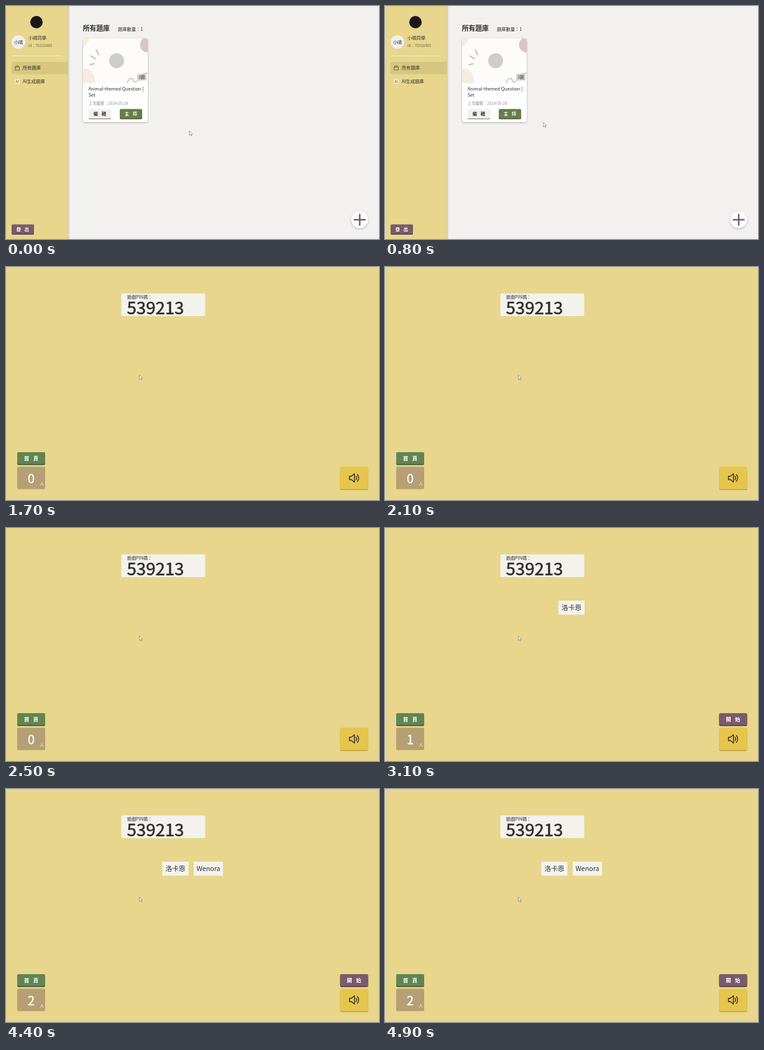
Animation of 600 by 375 pixels, one loop 5 s. Source, as an HTML page:

```html
<!DOCTYPE html>
<html lang="zh-Hant">
<head>
<meta charset="utf-8">
<title>題庫</title>
<style>
html, body { margin: 0; width: 100%; height: 100%; overflow: hidden; background: #e7d68b; }
svg { display: block; width: 100vw; height: 100vh; }
text { font-family: "Noto Sans CJK TC", "Noto Sans CJK", "Noto Sans TC", sans-serif; fill: #2e2e2e; white-space: pre; }
.s { font-size: 7.25px; }
.b { font-weight: 700; }
.m { font-weight: 500; }
.mid { text-anchor: middle; }
.w { fill: #fff; }
.big { font-size: 8.4px; font-weight: 700; fill: #fff; }
.name { font-size: 10.7px; }
.line { fill: none; stroke-linecap: round; stroke-linejoin: round; }
.soft { filter: drop-shadow(0 1px 1.5px rgba(0, 0, 0, .28)); }
</style>
</head>
<body>
<svg viewBox="0 0 600 375">
  <defs>
    <clipPath id="cover"><path d="M124 124V56a4 4 0 0 1 4-4h96a4 4 0 0 1 4 4v68z"/></clipPath>
    <linearGradient id="edge"><stop stop-color="#000" stop-opacity=".2"/><stop offset="1" stop-color="#000" stop-opacity="0"/></linearGradient>
  </defs>

  <g id="home">
    <rect width="600" height="375" fill="#f2f1ef"/>
    <rect x="99" width="4" height="375" fill="url(#edge)"/>
    <rect width="99.5" height="375" fill="#e7d68b"/>
    <circle cx="49" cy="26" r="10" fill="#191817"/>
    <circle cx="20" cy="58" r="11" fill="#f1efec"/>
    <text class="s mid" x="20" y="60.7">小晴</text>
    <text class="s" x="36" y="54">小晴同學</text>
    <text x="36" y="66.3" font-size="6.05" style="fill:#6b664f">id：70316485</text>
    <path d="M9 80.3h81.5" stroke="#f6f1dc"/>
    <path d="M99.5 90H12a3 3 0 0 0-3 3v13.5a3 3 0 0 0 3 3h87.5z" fill="#d6c67f"/>
    <g class="line" stroke="#57503a" stroke-width=".9">
      <rect x="14.5" y="98.3" width="7" height="4.8" rx=".8"/>
      <path d="M15 98l1.2-1.7h3.6l1.2 1.7"/>
    </g>
    <text class="s" x="27" y="102.4">所有題庫</text>
    <rect x="14" y="117.5" width="8" height="8" rx="1.3" fill="#f4eed3"/>
    <text class="b mid" x="18" y="123.7" font-size="5.5" style="fill:#9a8a4e">AI</text>
    <text class="s" x="27" y="124.2">AI生成題庫</text>
    <rect x="9" y="352" width="36" height="16" rx="2" fill="#573f4b"/>
    <rect x="9" y="351.5" width="36" height="15" rx="2" fill="#7b5a6b"/>
    <text class="s b w" x="16.7 29.7" y="361.8">登出</text>

    <text class="b" x="123.7" y="39.5" font-size="10.8">所有題庫</text>
    <text class="s m" x="180" y="39.5">題庫數量：1</text>

    <rect class="soft" x="124" y="52" width="104" height="135" rx="4" fill="#fff"/>
    <g clip-path="url(#cover)">
      <rect x="124" y="52" width="104" height="72" fill="#fdfcfa"/>
      <circle cx="228" cy="62.5" r="12.5" fill="#d5c6cc"/>
      <path d="M122 52h12q-1 8-10 14z" fill="#f4ecdd"/>
      <path d="M122 102q10-3 16 4t5 20h-21z" fill="#f5ecdf"/>
      <g class="line" stroke="#dfc1b9">
        <path d="M195 123c5-9 9-7 10-3s6 3 9-4 6-7 14-8" stroke-width="1.8"/>
        <path d="M145.5 71l3.5 7M137 80.500l6.500 4.500M135.500 94.500l6-1.500" stroke-width="2.600"/>
      </g>
      <circle cx="178" cy="88" r="12" fill="#cfcccc"/>
    </g>
    <rect x="211" y="109" width="15" height="11" rx="2" fill="#d6d3d0"/>
    <text class="m mid" x="218.5" y="117" font-size="6.7">3題</text>
    <text class="m" font-size="7.25"><tspan x="132.7" y="136">Animal-themed Question</tspan><tspan x="132.7" y="146">Set</tspan></text>
    <path class="line" d="M220.3 131.5v0M220.3 134.3v0M220.3 137.1v0" stroke="#2e2e2e" stroke-width="1.4"/>
    <text x="132.7" y="159" font-size="6.3" style="fill:#8d8d8d">上次編輯：2024-05-28</text>
    <rect x="133" y="167" width="36" height="15.3" rx="2" fill="#8d8d89"/>
    <rect x="133" y="165.7" width="36" height="15.3" rx="2" fill="#f2f1ef"/>
    <text class="s b" x="140.7 153.7" y="176">編輯</text>
    <rect id="hostEdge" x="183" y="167" width="36" height="15.3" rx="2"/>
    <rect id="host" x="183" y="165.7" width="36" height="15.3" rx="2"/>
    <text class="s b w" x="190.7 203.7" y="176">主持</text>

    <circle class="soft" cx="569" cy="344" r="13.7" fill="#fff"/>
    <path d="M559.5 344h19M569 334.5v19" stroke="#7b5a6b" stroke-width="2.5"/>
  </g>

  <g id="lobby">
    <rect width="600" height="375" fill="#e7d68b"/>
    <rect x="185.5" y="42.5" width="135" height="36.5" rx="2" fill="#f4f2ed"/>
    <text class="m" x="194.7" y="51" font-size="7.2">遊戲PIN碼：</text>
    <text x="194.5" y="76" font-size="27.6" stroke="#2e2e2e" stroke-width=".6">539213</text>

    <g id="first">
      <rect x="279" y="117" width="42" height="22.5" fill="#f5f3ee"/>
      <text class="name mid" x="300" y="132.3">洛卡恩</text>
    </g>
    <g id="second">
      <rect x="302" y="117" width="47" height="22.5" fill="#f5f3ee"/>
      <text class="name mid" x="325.5" y="132.3">Wenora</text>
    </g>

    <rect x="18" y="299" width="45" height="19.7" rx="2" fill="#465c3c"/>
    <rect x="18" y="298" width="45" height="19" rx="2" fill="#628452"/>
    <text class="big" x="29 43.7" y="311">首頁</text>
    <rect x="18" y="321.5" width="45" height="36" rx="2" fill="#b69f74"/>
    <text id="count" class="mid w" x="40.5" y="347.8" font-size="20" stroke="#fff" stroke-width=".4"></text>
    <text class="w" x="54.5" y="351.5" font-size="6.5">人</text>

    <g id="start">
      <rect x="537.5" y="299" width="45" height="19.7" rx="2" fill="#573f4b"/>
      <rect x="537.5" y="298" width="45" height="19" rx="2" fill="#7b5a6b"/>
      <text class="big" x="548.2 563" y="311">開始</text>
    </g>
    <rect x="537.5" y="323" width="45" height="36" rx="2" fill="#c2a242"/>
    <rect x="537.5" y="321.5" width="45" height="36" rx="2" fill="#e6c54d"/>
    <path class="line" d="M552.5 336.8h3.2l4.8-4v13.400l-4.800-4h-3.200zM563 336.600q2.400 2.900 0 5.800M565.300 334q4.300 5.500 0 11" stroke="#2e2e2e" stroke-width="1.400"/>
  </g>

  <path id="cursor" d="M0 0V7.2L1.7 5.7L2.9 8.2L4 7.7L2.9 5.3H5Z" fill="#fff" stroke="#666" stroke-width=".6"/>
</svg>
<script>
const LOOP = 5000, STEP = 100;
const LOBBY = 1700, JOIN_1 = 3100, JOIN_2 = 3800;
const $ = id => document.getElementById(id);
const show = (id, on) => $(id).setAttribute("display", on ? "inline" : "none");
const ease = u => u * u * (3 - 2 * u);

function draw(now) {
  const t = Math.floor(now % LOOP / STEP) * STEP;
  const k = ease(Math.min(1, Math.max(0, (t - 300) / 1000)));
  const x = 295 - 80.5 * k, y = 201 - 27.3 * k;
  const hover = x < 219;
  const people = (t >= JOIN_1) + (t >= JOIN_2);

  show("home", t < LOBBY);
  show("lobby", t >= LOBBY);
  $("host").setAttribute("fill", hover ? "#363e24" : "#667d49");
  $("hostEdge").setAttribute("fill", hover ? "#282e1a" : "#46552f");
  show("first", people > 0);
  show("second", people > 1);
  show("start", people > 0);
  $("first").setAttribute("transform", `translate(${people > 1 ? -27.5 : 0} 0)`);
  $("count").textContent = people;
  $("cursor").setAttribute("transform", `translate(${x} ${y})`);
  requestAnimationFrame(draw);
}
draw(0);
</script>
</body>
</html>
```
